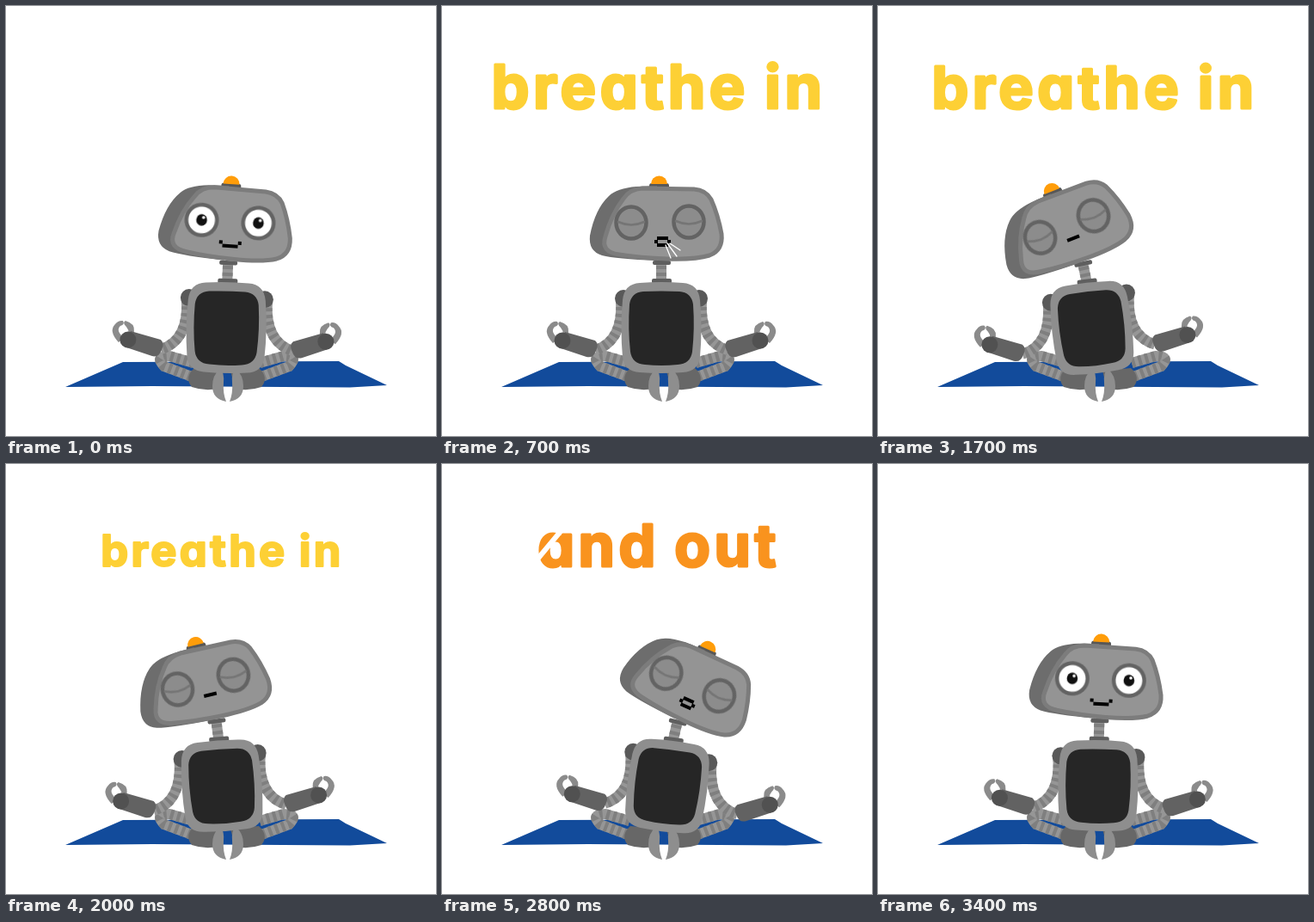
Recreate the animation shown at these times as an HTML page without scripts. Size 500 by 500 pixels, loop 3800 ms.

```html
<!DOCTYPE html>
<html lang="en">
<head>
<meta charset="utf-8">
<title>Breathing robot</title>
<style>
@property --lean { syntax: "<number>"; inherits: true; initial-value: 0; }

html, body { margin: 0; width: 100%; height: 100%; overflow: hidden; background: #fff; }
svg { display: block; width: 100vw; height: 100vh; }

/* One lean value drives the whole body; everything moves on a 100 ms beat. */
.robot, .word, .scribble, .face * { animation: 3.8s step-end infinite; }
.robot { animation-name: lean; }
.body { transform-origin: 255px 430px; transform: rotate(calc(var(--lean) * .3deg)); }
.neck { transform-origin: 255px 320px; transform: rotate(calc(var(--lean) * .25deg)); }
.head { transform-origin: 255px 299px; transform: rotate(calc(var(--lean) * .45deg)); }
.arm-l { transform: translate(calc(var(--lean) * .47px), calc(var(--lean) * -.22px)); }
.arm-r { transform: translate(calc(var(--lean) * .47px), calc(var(--lean) * .3px)); }

@keyframes lean {
  0% { --lean: 4 }
  5.26% { --lean: 3.6 }
  7.89% { --lean: 3 }
  10.52% { --lean: 2.4 }
  13.15% { --lean: 1.7 }
  15.78% { --lean: 1 }
  18.42% { --lean: 0 }
  21.05% { --lean: -6 }
  23.68% { --lean: -13 }
  26.31% { --lean: -19 }
  28.94% { --lean: -23 }
  34.21% { --lean: -23.5 }
  39.47% { --lean: -23 }
  44.73% { --lean: -21.5 }
  49.99% { --lean: -17.5 }
  52.63% { --lean: -13.5 }
  55.26% { --lean: -6 }
  57.89% { --lean: 4 }
  60.52% { --lean: 15 }
  63.15% { --lean: 24 }
  65.78% { --lean: 27.5 }
  68.42% { --lean: 29 }
  73.68% { --lean: 24 }
  76.31% { --lean: 19 }
  78.94% { --lean: 14.4 }
  81.57% { --lean: 9.5 }
  84.21% { --lean: 6 }
  86.84% { --lean: 3.3 }
  89.47%, 100% { --lean: 3 }
}

.word {
  font: 700 68px Inter, "Open Sans", sans-serif;
  font-feature-settings: "cv11";
  letter-spacing: 4.5px; word-spacing: -3px; text-anchor: middle;
  stroke-width: 3; stroke-linejoin: round;
  transform-origin: 250px 121px;
}
.in { fill: #fdd035; stroke: #fdd035; animation-name: word-in; }
.out { fill: #f9931e; stroke: #f9931e; animation-name: word-out; }
@keyframes word-in {
  0% { transform: scale(0) }
  5.26% { transform: scale(.08) }
  7.89% { transform: scale(.25) }
  10.52% { transform: scale(.52) }
  13.15% { transform: scale(.8) }
  15.78% { transform: scale(.97) }
  18.42% { transform: scale(1.027) }
  21.05% { transform: scale(1.024) }
  23.68% { transform: scale(1.016) }
  26.31% { transform: scale(1.007) }
  28.94% { transform: scale(1) }
  49.99% { transform: scale(.93) }
  52.63% { transform: scale(.745) }
  55.26% { transform: scale(.4) }
  57.89%, 100% { transform: scale(0) }
}
@keyframes word-out {
  0% { transform: scale(0) }
  57.89% { transform: scale(.1) }
  60.52% { transform: scale(.42) }
  63.15% { transform: scale(.745) }
  65.78% { transform: scale(.94) }
  68.42% { transform: scale(1) }
  89.47%, 100% { transform: scale(0) }
}

/* White zigzag that rubs the last word out. */
.scribble {
  fill: none; stroke: #fff; stroke-linecap: round; stroke-linejoin: round;
  stroke-dasharray: 100 100; animation-name: rub;
}
@keyframes rub {
  0% { stroke-dashoffset: 100; stroke-width: 0 }
  73.68% { stroke-dashoffset: 96; stroke-width: 6 }
  76.31% { stroke-dashoffset: 90; stroke-width: 7 }
  78.94% { stroke-dashoffset: 81; stroke-width: 8 }
  81.57% { stroke-dashoffset: 64; stroke-width: 16 }
  84.21% { stroke-dashoffset: 47; stroke-width: 24 }
  86.84% { stroke-dashoffset: 30; stroke-width: 28 }
  89.47%, 100% { stroke-dashoffset: 0; stroke-width: 30 }
}

.face .awake { animation-name: awake; }
.face .asleep { animation-name: asleep; }
.face .smile { animation-name: smile; }
.face .round { animation-name: round; }
.face .flat { animation-name: flat; }
.face .breath { animation-name: breath; }
@keyframes awake { 0%, 84.21%, 100% { opacity: 1 } 10.52% { opacity: 0 } }
@keyframes asleep { 0%, 84.21%, 100% { opacity: 0 } 10.52% { opacity: 1 } }
@keyframes smile { 0%, 76.31%, 100% { opacity: 1 } 13.15% { opacity: 0 } }
@keyframes round { 0%, 26.31%, 76.31%, 100% { opacity: 0 } 13.15%, 57.89% { opacity: 1 } }
@keyframes flat { 0%, 57.89%, 100% { opacity: 0 } 26.31% { opacity: 1 } }
@keyframes breath { 0%, 23.68%, 100% { opacity: 0 } 13.15% { opacity: 1 } }

.tube { fill: none; stroke: #969696; stroke-width: 12; }
.bands { fill: none; stroke: #7f7f7f; stroke-width: 12; stroke-dasharray: 4 4; }
.line { fill: none; stroke-linecap: round; }
</style>
</head>
<body>
<svg viewBox="0 0 500 500">
  <defs>
    <g id="arm">
      <path class="tube" d="M208 342C210 372 201 393 178 400"/>
      <path class="bands" d="M208 342C210 372 201 393 178 400"/>
      <circle cx="211" cy="340" r="10" fill="#595959"/>
      <g fill="#8b8b8b">
        <path d="M129 392Q117 379 125 371Q129 366 134 367Q137 371 131 373Q125 379 136 387Z"/>
        <path d="M136 388Q144 381 138 374Q133 369 137 367Q148 370 147 379Q147 385 142 390Z"/>
      </g>
      <path d="M143 379L178 389Q183 393 179 401Q176 410 168 408L138 398Z" fill="#626262"/>
      <circle cx="140" cy="389" r="9.5" fill="#515151"/>
    </g>
    <g id="leg">
      <path class="tube" d="M218 415L190 407Q172 407 184 419L216 431"/>
      <path class="bands" d="M218 415L190 407Q172 407 184 419L216 431"/>
      <path d="M219 421L252 424L247 445Q230 448 216 443Q207 432 219 421Z" fill="#676767"/>
    </g>
    <path id="claw" d="M249 422Q254 426 253 438Q252 450 256 460Q240 457 240 442Q240 429 249 422Z" fill="#8e8e8e"/>
    <g id="open-eye">
      <circle r="20" fill="#636363"/>
      <circle r="15.5" fill="#fff"/>
      <ellipse rx="6.3" ry="6.8" fill="#111"/>
      <circle cx="2" cy="-3" r="1.8" fill="#fff"/>
    </g>
    <g id="shut-eye">
      <ellipse rx="17.5" ry="18.5" fill="#8c8c8c" stroke="#636363" stroke-width="4.5"/>
      <path class="line" d="M-15 -1Q0 6 15 -1" stroke="#757575" stroke-width="2.5"/>
    </g>
  </defs>

  <text class="word in" x="252" y="119">breathe in</text>
  <text class="word out" x="252" y="119">and out</text>
  <path class="scribble" pathLength="100" d="M104 119l40-48l-20 48l40-48l-20 48l40-48l-20 48l40-48l-20 48l40-48l-20 48l40-48l-20 48l40-48l-20 48l40-48l-20 48l40-48l-20 48l40-48l-20 48l40-48l-20 48l40-48l-20 48l40-48l-20 48l40-48"/>

  <path d="M69 443L136 414L387 413L395 418L443 441L400 443.5L170 442Z" fill="#124b9b"/>

  <g class="robot">
    <use href="#leg"/>
    <use href="#leg" transform="matrix(-1 0 0 1 513 0)"/>
    <g class="arm-l"><use href="#arm"/></g>
    <g class="arm-r"><use href="#arm" transform="matrix(-1 0 0 1 510 0)"/></g>

    <g class="body">
      <g class="neck">
        <path class="tube" d="M255 300V320"/>
        <path class="bands" d="M255 302V320"/>
        <rect x="245" y="296" width="21" height="5" rx="2" fill="#5f5f5f"/>
        <g class="head">
          <rect x="241" y="206" width="23" height="7" rx="3" fill="#575757"/>
          <path d="M243 207A9.5 9.5 0 0 1 262 207Z" fill="#ff9d0a"/>
          <path d="M194 221Q203 212 226 210L250 209V296Q202 294 186 290Q170 285 172 267Q178 236 194 221Z" fill="#6d6d6d"/>
          <path d="M211 224Q218 213 233 212L293 213Q307 214 313 225Q321 243 325 265Q327 284 311 290Q295 295 262 294Q230 293 206 289Q184 286 190 268Q197 242 211 224Z" fill="#949494" stroke="#7c7c7c" stroke-width="5"/>
          <g class="face">
            <g class="awake">
              <use href="#open-eye" x="221" y="251"/>
              <use href="#open-eye" x="287" y="250"/>
            </g>
            <g class="asleep">
              <use href="#shut-eye" x="220" y="252"/>
              <use href="#shut-eye" x="287" y="251"/>
            </g>
            <path class="smile" d="M243 273h4v4h18v-4h4v4h-4v4h-18v-4h-4z"/>
            <path class="round" d="M250 268h13v4h-13zM247 272h4v4h-4zM262 272h4v4h-4zM250 276h13v4h-13z"/>
            <path class="flat" d="M248 265h15v4h-15z"/>
            <path class="breath line" d="M260 278L266 293M262 276L273 291M265 276L277 284" stroke="#fff" stroke-width="1.3"/>
          </g>
        </g>
      </g>
      <rect x="244" y="317" width="23" height="6" rx="2" fill="#5f5f5f"/>
      <path d="M230 322Q255 320 280 322Q298 323 300 342Q303 375 300 408Q298 425 280 426Q255 428 230 426Q212 425 210 408Q207 375 210 342Q212 323 230 322Z" fill="#8e8e8e"/>
      <path d="M234 332Q255 331 276 332Q290 333 292 347Q294 375 291 402Q289 416 274 417Q255 419 236 417Q221 416 219 402Q216 375 218 347Q220 333 234 332Z" fill="#262626"/>
    </g>

    <use href="#claw"/>
    <use href="#claw" transform="matrix(-1 0 0 1 516 0)"/>
  </g>
</svg>
</body>
</html>
```
